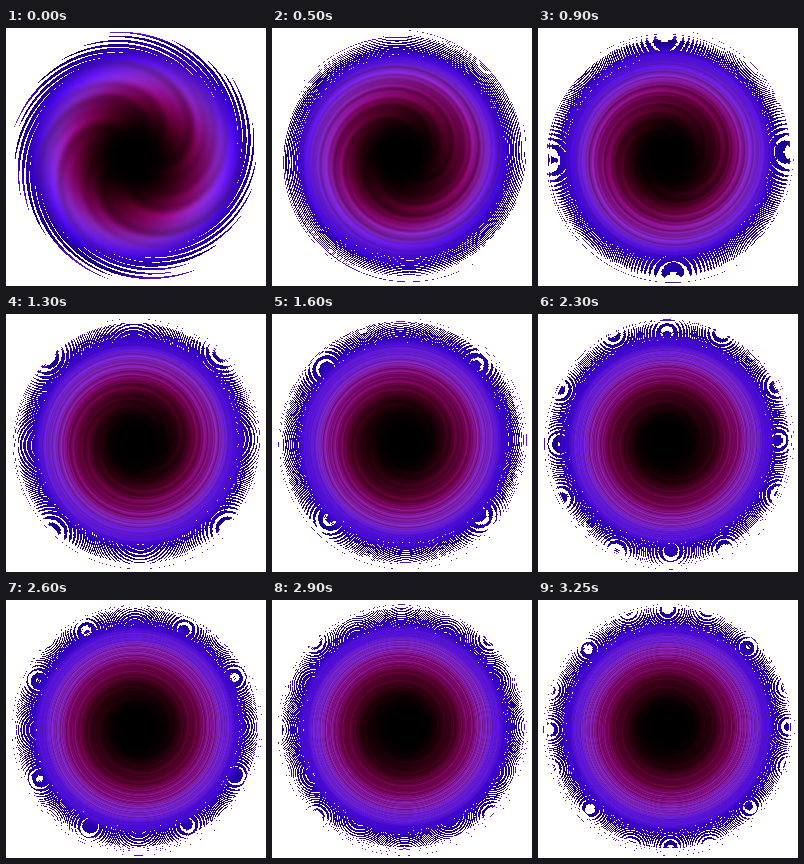
An HTML page with a canvas for the animation above (3300 ms loop, 260 by 258 pixels).

```html
<!DOCTYPE html>
<html>
<head>
<meta charset="utf-8">
<style>
html, body { margin: 0; width: 100%; height: 100%; overflow: hidden; background: #fff; }
canvas { display: block; }
</style>
</head>
<body>
<canvas id="stage" width="260" height="258"></canvas>
<script>
const W = 260, H = 258, RIM = 128, ARMS = 25, STEPS = 66, STEP_MS = 50;
const ctx = document.getElementById('stage').getContext('2d');
const img = ctx.createImageData(W, H);

let seed = 2917;
const random = () => (seed = (seed * 16807) % 2147483647) / 2147483647;
const bump = (x, centre, width) => Math.exp(-(((x - centre) / width) ** 2));
const clamp01 = v => Math.max(0, Math.min(1, v));

// Each arm reaches from the gap beside it out to its tip
const arms = Array.from({ length: ARMS }, () => ({
  gap: 98 + 11 * random(),
  tip: 119 + 4 * random() + 9 * random() ** 6
}));

function armRadius(u) {
  const turn = u / (2 * Math.PI);
  const v = (turn - Math.floor(turn)) * ARMS;
  const { gap, tip } = arms[Math.floor(v) % ARMS];
  return gap + (tip - gap) * Math.sin(Math.PI * (v % 1));
}

// Black core, maroon, magenta, violet, indigo, then a violet fringe
function colour(r) {
  const fringe = clamp01((r - 117) / 6);
  return [
    128 * bump(r, 75, 32) + 85 * fringe,
    34 * bump(r, 84, 14) + 16 * fringe,
    212 * bump(r, 95, 33) + 110 * fringe
  ].map(c => c * clamp01((r - 12) / 22));
}
const ramp = Array.from({ length: 321 }, (_, i) => colour(i / 2));

function draw(step) {
  const twist = 0.062 + 0.0115 * step;
  const cx = 128.5 + Math.min(2, step * 0.2), cy = 127.7;
  for (let y = 0, p = 0; y < H; y++) {
    for (let x = 0; x < W; x++, p += 4) {
      const dx = x - cx, dy = y - cy, r = Math.hypot(dx, dy);
      const u = Math.atan2(dy, dx) + twist * (r * r - RIM * RIM) / (2 * RIM);
      let rgb = [255, 255, 255], light = 1;
      if (r < armRadius(u)) {
        const wave = Math.sin(3 * u + 1) + Math.sin(5 * u + 4)
          + Math.sin(8 * u + 2) + 0.7 * Math.sin(13 * u);
        const depth = r - 2 * Math.cos(u + 1.5) + Math.min(1, r / 60) * wave;
        rgb = ramp[Math.round(2 * Math.max(0, depth))];
        light += 0.065 * wave;
      }
      for (let c = 0; c < 3; c++) img.data[p + c] = rgb[c] * light;
      img.data[p + 3] = 255;
    }
  }
  ctx.putImageData(img, 0, 0);
}

const start = performance.now();
let shown = -1;
function tick() {
  const step = Math.floor((performance.now() - start) / STEP_MS) % STEPS;
  if (step !== shown) draw(shown = step);
  requestAnimationFrame(tick);
}
tick();
</script>
</body>
</html>
```
